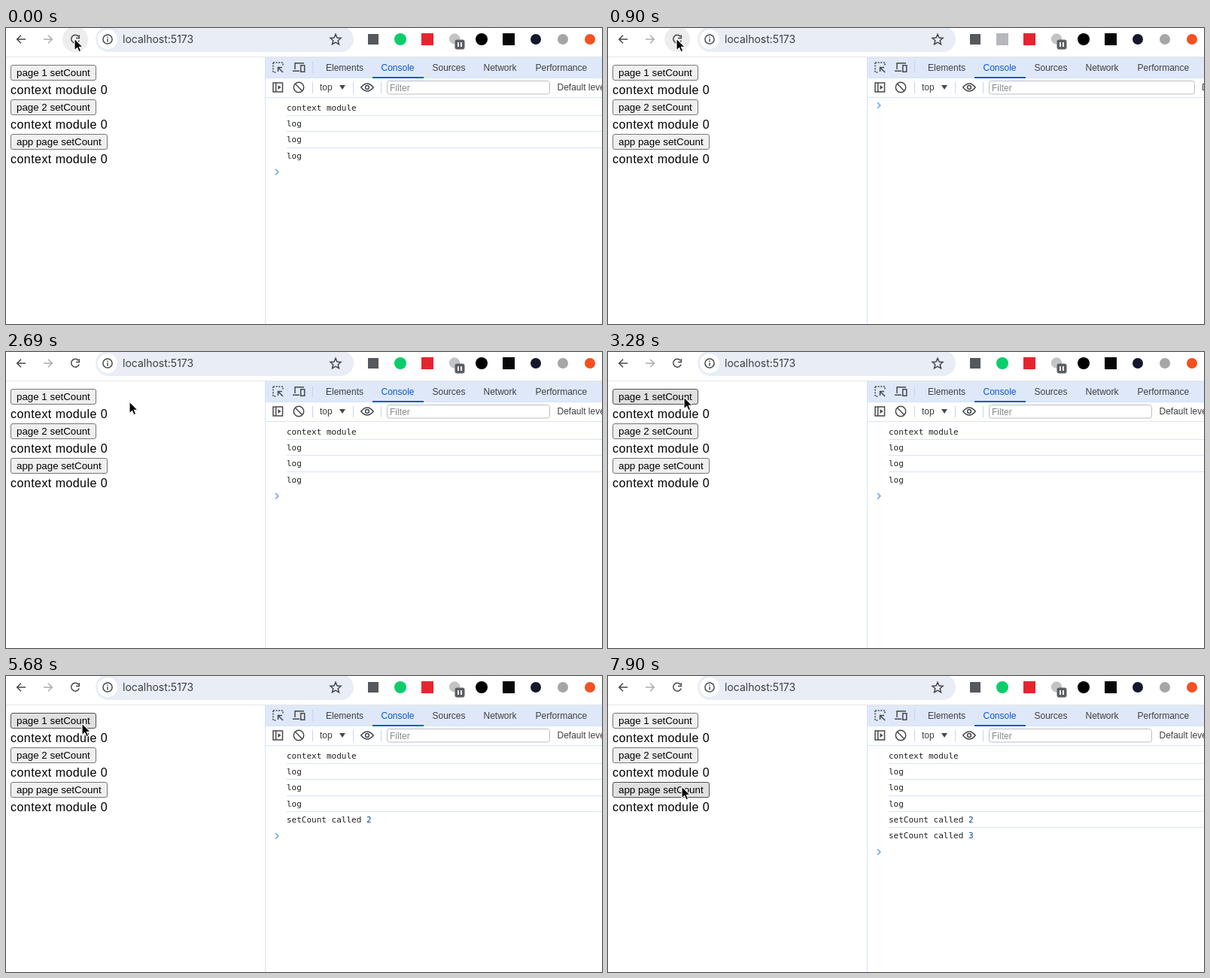
These frames come from a looping animation (792x394 px, 8 s). An HTML page:

```html
<!DOCTYPE html>
<html lang="en">
<head>
<meta charset="utf-8">
<title>Counter console</title>
<style>
html, body { margin: 0; width: 100%; height: 100%; overflow: hidden; background: #fff; }
svg { display: block; width: 792px; height: 394px; }
text { white-space: pre; }
.ui { font: 12px "Liberation Sans", Arial, sans-serif; fill: #3c3f43; }
.button text { font: 13.333px "Liberation Sans", Arial, sans-serif; fill: #000; }
.body { font: 16px "Liberation Sans", Arial, sans-serif; letter-spacing: .45px; }
.address { font: 14px Inter, Roboto, sans-serif; fill: #3c4043; }
.mono { font: 11px "DejaVu Sans Mono", monospace; fill: #1f1f1f; }
.icon { fill: none; stroke: #45484c; stroke-width: 1.5; }
.rule { fill: none; stroke: #d3e3fd; }
</style>
</head>
<body>
<svg viewBox="0 0 792 394">
  <rect width="792" height="394" fill="#fff"/>

  <!-- browser toolbar -->
  <path d="M0 38.5H792" stroke="#e3e5e8"/>
  <circle id="halo" cx="92" cy="15" r="17" fill="#ededee"/>
  <g class="icon" stroke-width="1.7">
    <path d="M26 15H15M20 9.7L14.7 15L20 20.3"/>
    <path d="M50 15H61M56 9.7L61.3 15L56 20.3" stroke="#aaacaf"/>
    <path id="reload" d="M96.2 11.2A5.4 5.4 0 1 0 97.2 16.5M97.3 9.2V13.4H93"/>
    <path id="stop" d="M87.5 10.5L96.5 19.5M96.5 10.5L87.5 19.5"/>
  </g>
  <rect x="119" y="-2" width="343" height="34" rx="17" fill="#e9edf5"/>
  <circle cx="135" cy="15" r="13" fill="#fff"/>
  <circle cx="135" cy="15" r="6.1" class="icon"/>
  <path d="M135 14.2V18.4M135 11.4V13" class="icon"/>
  <text x="155" y="20" class="address">localhost:5173</text>
  <path d="M438 8.4L440 13L445 13.4L441.2 16.7L442.4 21.6L438 19L433.6 21.6L434.8 16.7L431 13.4L436 13Z" class="icon"/>
  <g id="extensions">
    <rect x="481" y="8" width="14" height="14" fill="#55585c"/>
    <circle id="online" cx="524" cy="15" r="8" fill="#0bce6b"/>
    <rect id="offline" x="516" y="7" width="16" height="16" fill="#b7b8bb"/>
    <rect x="552" y="7" width="16" height="16" fill="#e5252e"/>
    <circle cx="596" cy="14.5" r="7.2" fill="#c3c4c6"/>
    <rect x="596.5" y="15.5" width="13" height="13" rx="3" fill="#5b5e62"/>
    <path d="M601 19V25M605 19V25" stroke="#fff" stroke-width="2"/>
    <circle cx="632" cy="15" r="8" fill="#000"/>
    <rect x="660" y="7" width="16" height="16" fill="#080808"/>
    <circle cx="704" cy="15" r="7" fill="#15182b"/>
    <circle cx="740" cy="15" r="7" fill="#a5a6a8"/>
    <circle cx="776" cy="15" r="7" fill="#f5501f"/>
  </g>

  <g id="page"></g>

  <!-- developer panel -->
  <rect x="345" y="39" width="447" height="27" fill="#dfe8f8"/>
  <path d="M344.5 39V394M345 66.5H792M345 92.5H792" class="rule"/>
  <path d="M407.5 45V60M407.5 72V87M461.5 72V87M498.5 72V87" stroke="#c5d5ef"/>
  <rect x="487" y="65" width="68" height="2" fill="#0b57d0"/>
  <g class="icon" stroke-width="1.4">
    <path d="M355 46H368V51M355 46V59H360" stroke-dasharray="2 1.6"/>
    <path d="M368 59L361.5 52.5M361.5 58V52.5H367"/>
    <path d="M384 55V46.7H396M381 57.3H390"/>
    <rect x="391.7" y="49.7" width="5" height="8.6"/>
    <rect x="355" y="73" width="12.5" height="12"/>
    <path d="M358.7 73V85"/>
    <path d="M361.5 76L365.5 79L361.5 82Z" fill="#45484c" stroke="none"/>
    <circle cx="389" cy="79" r="6.7"/>
    <path d="M384.3 74.3L393.7 83.7"/>
    <path d="M471.8 79Q480 68.8 488.2 79Q480 89.2 471.8 79Z"/>
    <circle cx="480" cy="79" r="2.4"/>
  </g>
  <g id="tabs" class="ui"></g>
  <text x="417" y="83.3" class="ui">top</text>
  <path d="M443 76H451L447 82Z" fill="#45484c"/>
  <rect id="filter" x="506.5" y="70.5" height="17.5" rx="3" fill="#fff" stroke="#babdc2"/>
  <text x="510" y="84" class="ui" style="fill:#85888c">Filter</text>
  <text id="levels" y="83.3" class="ui">Default levels</text>
  <g id="log" class="mono"></g>
  <path id="prompt" d="M-2 -3.7L1.9 0L-2 3.7" fill="none" stroke="#5b9bf5" stroke-width="1.4"/>

  <path id="cursor" d="M0 0V15.8L3.6 12.4L6 17.8L8.7 16.6L6.4 11.3H11.2Z" fill="#000" stroke="#fff" stroke-width="1.1"/>
</svg>
<script>
const LOOP = 8000;
const $ = id => document.getElementById(id);
const show = (el, on) => el.setAttribute("visibility", on ? "visible" : "hidden");
const between = (t, a, b) => t >= a && t < b;

const buttons = [
  { label: "page 1 setCount", y: 49, w: 114 },
  { label: "page 2 setCount", y: 95, w: 114 },
  { label: "app page setCount", y: 141, w: 129 }
];
$("page").innerHTML = buttons.map(b => `
  <g class="button">
    <rect x="6.5" y="${b.y + .5}" width="${b.w - 1}" height="20" rx="2.5"/>
    <text x="14" y="${b.y + 15}">${b.label}</text>
  </g>
  <text class="body" x="6" y="${b.y + 39}">context module 0</text>`).join("");
const boxes = [...document.querySelectorAll(".button rect")];

const tabs = [["Elements", 425], ["Console", 498.5], ["Sources", 566.5], ["Network", 634.5], ["Performance", 703.5]];
$("tabs").innerHTML = tabs.map(([name, x]) =>
  `<text x="${x}" y="56.5"${name === "Console" ? ' style="fill:#0b57d0"' : ""}>${name}</text>`).join("");

const ROW = 21.2;
const messages = ["context module", "log", "log", "log", "setCount called 2", "setCount called 3"];
$("log").innerHTML = messages.map((m, i) => `<g>
  ${i ? `<path class="rule" d="M373 ${Math.round(95 + ROW * i) + .5}H792"/>` : ""}
  <text x="373" y="${Math.round(110 + ROW * i)}">${m.replace(/\d/, '<tspan fill="#0842a0">$&</tspan>')}</text>
</g>`).join("");
const rows = [...$("log").children];

// Pointer samples: time, x, y; each is held until the next.
const path = [
  [0, 91, 14],
  [1500, 101, 30], [1650, 126, 72], [1800, 158, 122], [1940, 184, 156], [2090, 193, 166],
  [2390, 196, 150], [2540, 184, 106], [2690, 164, 66], [2840, 140, 62], [2990, 120, 61],
  [3130, 107, 60], [3280, 101, 60],
  [5680, 101, 63], [5820, 98, 80], [5970, 95, 98], [6110, 95, 108],
  [7600, 96, 124], [7750, 98, 140], [7900, 98, 147]
];

const looks = {
  idle: ["#efefef", "#767676"],
  hover: ["#e0e0e0", "#4f4f4f"],
  press: ["#f5f5f5", "#8d8d8d"]
};

function rowCount(t) {
  if (between(t, 750, 1050)) return 0;
  return 4 + (t >= 4180) + (t >= 6560);
}

function draw(t) {
  const [, x, y] = path.filter(p => p[0] <= t).pop();
  $("cursor").setAttribute("transform", `translate(${x} ${y})`);

  const pressed = between(t, 4030, 4180) || between(t, 6410, 6560);
  buttons.forEach((b, i) => {
    const over = x >= 6 && x < 6 + b.w && y >= b.y && y < b.y + 21;
    const [fill, stroke] = looks[over ? (pressed ? "press" : "hover") : "idle"];
    boxes[i].setAttribute("fill", fill);
    boxes[i].setAttribute("stroke", stroke);
  });

  const n = rowCount(t);
  rows.forEach((row, i) => show(row, i < n));
  $("prompt").setAttribute("transform", `translate(360 ${n ? 107 + ROW * n : 103})`);
  $("filter").setAttribute("width", n ? 216 : 273);
  $("levels").setAttribute("x", n ? 732.5 : 789);

  const loading = between(t, 600, 900);
  show($("halo"), t < 1500);
  show($("stop"), loading);
  show($("reload"), !loading);
  const offline = between(t, 750, 1200);
  show($("offline"), offline);
  show($("online"), !offline);
}

const start = performance.now();
function tick() {
  draw((performance.now() - start) % LOOP);
  requestAnimationFrame(tick);
}
tick();
</script>
</body>
</html>
```
